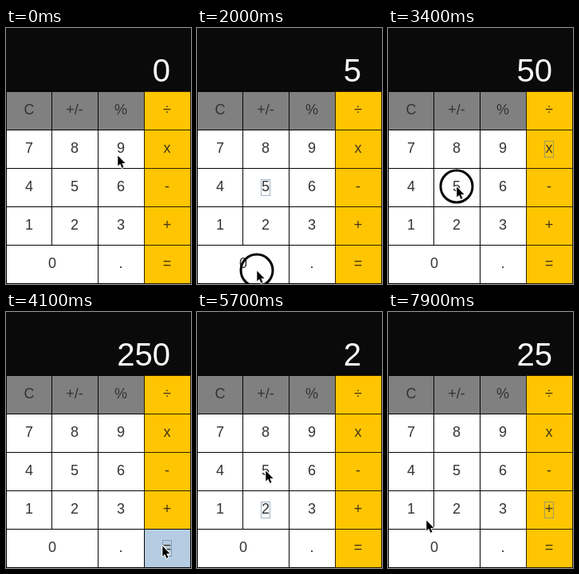
An HTML page that plays this animation: 232 px wide and 320 px high, repeating every 8000 ms.

```html
<!DOCTYPE html>
<html lang="en">
<head>
<meta charset="utf-8">
<title>Calculator</title>
<style>
  html, body { margin: 0; width: 100%; height: 100%; overflow: hidden; background: #0a0a0a; }
  svg { display: block; width: 232px; height: 320px; }
  text { font-family: "Liberation Sans", Arial, Helvetica, sans-serif; }
  .key { font-size: 18px; fill: #333; text-anchor: middle; }
  .op { fill: #43361a; }
  .face { stroke: #050505; }
  .face.op { fill: #ffc500; stroke: #2e2000; }
  .face.lit { fill: #b5cce2; stroke: #050505; }
  .display { font-size: 40px; fill: #fff; text-anchor: end; }
  .focus { fill: none; stroke: rgba(100, 130, 160, .6); }
  .ring { fill: none; stroke: #000; stroke-width: 3; }
  .arrow { fill: #000; stroke: #fff; stroke-width: 2; stroke-linejoin: round; paint-order: stroke; }
</style>
</head>
<body>
<svg id="stage" viewBox="0 0 232 320"></svg>
<script>
const LOOP = 8000, STEP = 100, TRAVEL = 400, FLASH = 100;
const stage = document.getElementById('stage');

function set(el, attrs) {
  for (const name in attrs) el.setAttribute(name, attrs[name]);
}
function add(tag, attrs, text = '') {
  const el = document.createElementNS('http://www.w3.org/2000/svg', tag);
  set(el, attrs);
  el.textContent = text;
  return stage.appendChild(el);
}

// Keypad: 58 x 48 cells below the display
const keys = {};
add('rect', { width: 232, height: 320, fill: '#0a0a0a' });
['C ± % ÷', '7 8 9 x', '4 5 6 -', '1 2 3 +', '0 0 . ='].forEach((row, r) => {
  row.split(' ').forEach((label, c) => {
    if (label in keys) return;
    const span = label === '0' ? 2 : 1, kind = c === 3 ? ' op' : '';
    const left = c * 58, top = 80 + r * 48, cx = Math.floor(left + 29 * span - c / 4);
    const face = add('rect', { class: 'face' + kind, x: left - .5 + !c, y: top - .5,
      width: 58 * span - !c, height: 48, fill: r ? '#fff' : '#808080' });
    add('text', { class: 'key' + kind, x: cx, y: top + 27.5 }, label === '±' ? '+/-' : label);
    keys[label] = { face, cx, top };
  });
});

const display = add('text', { class: 'display', x: 206, y: 67 });
const focus = add('rect', { class: 'focus', width: 11, height: 20 });
const ring = add('circle', { class: 'ring', r: 20 });
const arrow = add('path', { class: 'arrow',
  d: 'M.3 .5V13.4L3.2 10.8L5.4 15.8L7.5 14.9L5.4 10H9.5Z' });

// Pointer stops: where, when reached, and which key fires when
const home = { x: 140, y: 159, reach: 0 };
const stops = [
  { x: 86, y: 198, reach: 1000, key: '5', fire: 1400 },
  { x: 75, y: 303, reach: 1900, key: '0', fire: 2100 },
  { x: 197, y: 147, reach: 2600, key: 'x', fire: 2700 },
  { x: 86, y: 198, reach: 3300, key: '5', fire: 3500 },
  { x: 196, y: 292, reach: 3900, key: '=', fire: 4100 },
  { x: 199, y: 198, reach: 4600, key: '-', fire: 4800 },
  { x: 85, y: 247, reach: 5300, key: '2', fire: 5500 },
  { x: 86, y: 198, reach: 5700, key: '5', fire: 6100 },
  { x: 203, y: 297, reach: 6800 },
  { x: 203, y: 261, reach: 7200, key: '+', fire: 7400 },
  { x: 48, y: 260, reach: 7900 }
];
const presses = stops.filter(s => s.key);

const compute = {
  'x': (a, b) => a * b, '÷': (a, b) => a / b, '+': (a, b) => a + b, '-': (a, b) => a - b
};
function calculate(pressed) {
  let value = '0', stored = 0, op = null, fresh = true;
  for (const { key } of pressed) {
    if (/\d/.test(key)) {
      value = fresh ? key : value + key;
      fresh = false;
    } else {
      if (key === '=' && op) value = String(compute[op](stored, +value));
      else [stored, op] = [+value, key];
      fresh = true;
    }
  }
  return value;
}

function pointer(t) {
  let { x, y, reach: last } = home;
  for (const s of stops) {
    const from = Math.max(last, s.reach - TRAVEL);
    if (t <= from) break;
    const u = Math.min(1, (t - from) / (s.reach - from)), e = u * u * (3 - 2 * u);
    x += (s.x - x) * e;
    y += (s.y - y) * e;
    last = s.fire || s.reach;
  }
  return [x, y];
}

function show(el, on, attrs) {
  set(el, { ...attrs, visibility: on ? 'visible' : 'hidden' });
}

function render(t) {
  const [x, y] = pointer(t);
  const done = presses.filter(p => p.fire <= t), latest = done[done.length - 1];
  display.textContent = calculate(done);

  for (const label in keys) {
    const lit = label in compute || label === '=';
    keys[label].face.classList.toggle('lit',
      lit && latest?.key === label && t < latest.fire + FLASH);
  }
  const key = latest && keys[latest.key];
  show(focus, key, key && { x: key.cx - 5.5, y: key.top + 13.5 });
  show(ring, presses.some(p => t >= p.fire - STEP && t < p.fire), { cx: x, cy: y });
  set(arrow, { transform: `translate(${x} ${y})` });

  // Pressed borders sit above their neighbours' edges
}

const start = performance.now();
function tick() {
  const t = (performance.now() - start) % LOOP;
  render(Math.floor(t / STEP) * STEP);
  requestAnimationFrame(tick);
}
tick();
</script>
</body>
</html>
```
